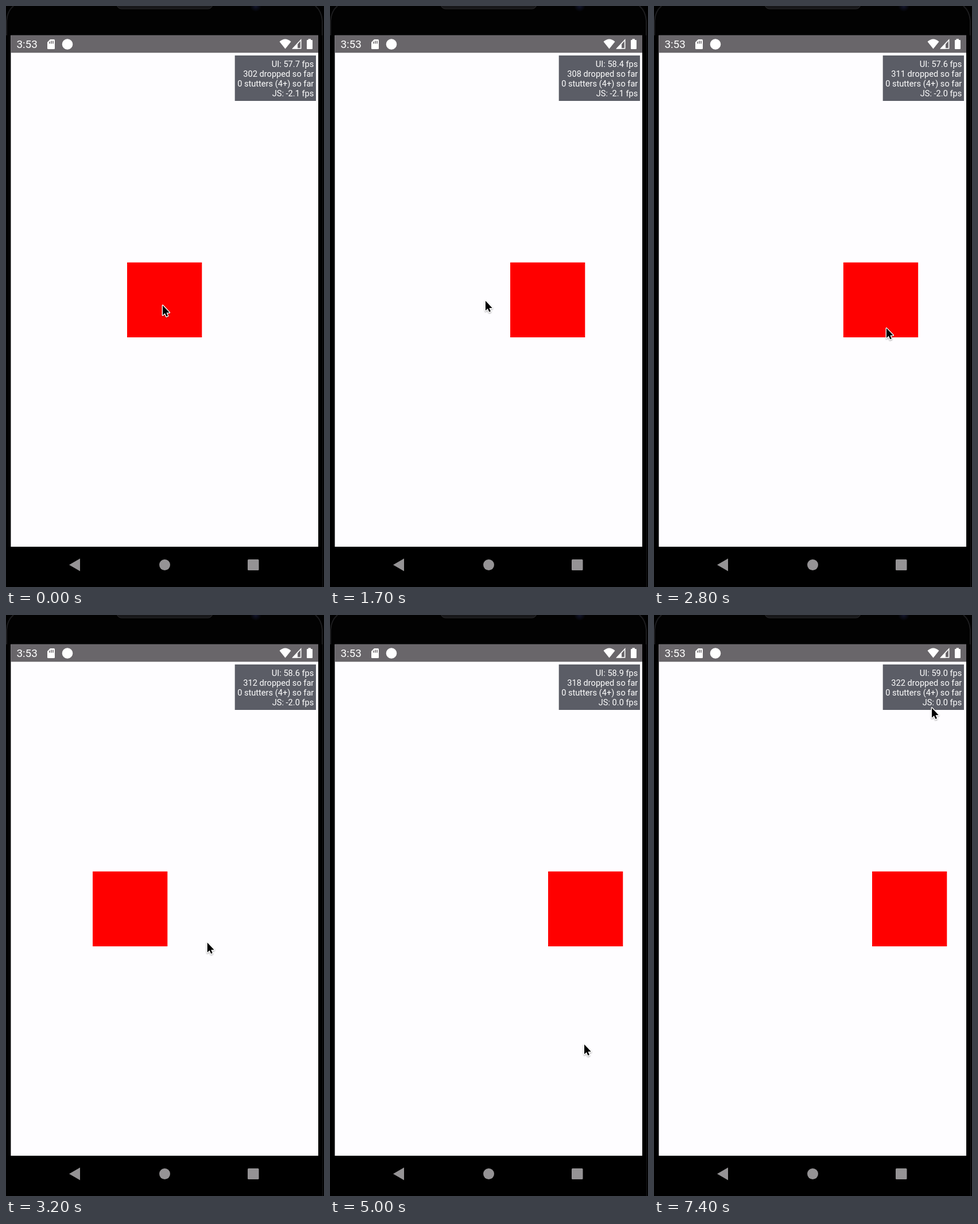
Animation, 554 px wide and 1010 px high, one loop 8 s. Source, as an HTML page:

```html
<!DOCTYPE html>
<html lang="en">
<head>
<meta charset="utf-8">
<title>Draggable square</title>
<style>
  html, body { margin: 0; width: 100%; height: 100%; overflow: hidden; background: #000; }
  svg { display: block; width: 100vw; height: 100vh; }
  text { font-family: Roboto, sans-serif; fill: #fff; }
  .stats { font-size: 14.6px; text-anchor: end; }
</style>
</head>
<body>
<svg viewBox="0 0 554 1010">
  <defs>
    <clipPath id="screen"><rect x="8" y="51" width="536" height="889"/></clipPath>
    <radialGradient id="sheen" gradientUnits="userSpaceOnUse" r="1" gradientTransform="translate(390 0) scale(190 55)">
      <stop stop-color="#131316"/><stop offset="1" stop-color="#020202"/>
    </radialGradient>
    <radialGradient id="lens">
      <stop stop-color="#11142c"/><stop offset="1" stop-color="#11142c" stop-opacity="0"/>
    </radialGradient>
    <filter id="shade" x="-50%" y="-50%" width="200%" height="200%">
      <feDropShadow dx="0" dy="1.2" stdDeviation="1" flood-opacity=".4"/>
    </filter>
  </defs>

  <rect width="554" height="1010"/>
  <path d="M0 51V24Q2 8 12 0H540Q549 8 551 24V51Z" fill="url(#sheen)"/>
  <path d="M1 51V26Q2 9 13 0M551 51V26Q550 9 539 0" fill="none" stroke="#1c1c1e" stroke-width="2"/>
  <path d="M551.5 51V1010" stroke="#151517"/>
  <rect x="193" y="-14" width="167" height="19" rx="8" fill="#171719" stroke="#29292b"/>
  <circle cx="435" cy="0" r="10" fill="url(#lens)"/>

  <rect x="8.4" y="51" width="535.6" height="889" fill="#fefdff"/>
  <rect x="8.4" y="50.7" width="535.6" height="30.6" fill="#69666a"/>

  <text x="18.4" y="73.2" font-size="18.9">3:53</text>
  <g fill="#fff">
    <path d="M77 58H83.5Q85 58 85 59.5V73.5Q85 75 83.5 75H73.5Q72 75 72 73.5V63Z"/>
    <path d="M76 62v3.5M79 60.5v5M82 60.5v5" stroke="#69666a" stroke-width="1.5"/>
    <circle cx="107" cy="66.5" r="9.3"/>
    <path d="M486.5 74.5L476.5 62Q486.5 53 496.5 62Z"/>
    <path d="M513.7 59V73.7H500Z" fill="none" stroke="#fff" stroke-width="1.6"/>
    <path d="M498.5 74.5L508 65V74.5Z"/>
    <path d="M526.5 59V57.2H531V59H533Q534 59 534 60V74Q534 75 533 75H525Q524 75 524 74V60Q524 59 525 59Z"/>
  </g>

  <g clip-path="url(#screen)"><rect id="square" y="445.8" width="130.3" height="130.2" fill="#f00"/></g>

  <rect x="398.7" y="86" width="141.3" height="79" fill="#5b5d66"/>
  <g class="stats">
    <text id="ui" x="536.3" y="105.5"/>
    <text id="dropped" x="536.3" y="122.7"/>
    <text x="536.3" y="139.8">0 stutters (4+) so far</text>
    <text id="js" x="536.3" y="157"/>
  </g>

  <g fill="#959395">
    <path d="M110 971.5L129 960.5V982.5Z"/>
    <circle cx="276.5" cy="971.5" r="9.5"/>
    <rect x="421" y="962" width="19.5" height="19" rx="1.5"/>
  </g>

  <path id="cursor" d="M0 0V17L3.9 13.4L6.4 19.3L9 18.2L6.5 12.4H11.8Z" stroke="#fff"
    stroke-width="2.6" stroke-linejoin="round" paint-order="stroke" filter="url(#shade)"/>
</svg>
<script>
const LOOP = 8000, STEP = 100;
const LAG = 120, RELEASE = 4000;

// Turning points of the pointer: time, position
const swings = [
  [0, 273], [280, 214], [680, 443], [1080, 70], [1420, 443], [1926, 148],
  [2808, 405], [3018, 189], [3336, 453], [3480, 453], [3680, 135],
  [RELEASE, 442], [4500, 442], [4700, 404], [5000, 443], [6500, 484]
];
const drift = [
  [0, 520], [1700, 512], [3200, 569], [3800, 604], [4300, 620],
  [4500, 620], [5000, 746], [5400, 262], [6500, 161]
];

// Monitor levels by refresh count
const MONITOR_START = 200, REFRESH = 480;
const uiLevel = [[-1, 57.7], [3, 58.4], [4, 56.6], [6, 58.6], [7, 58.6], [10, 58.9], [15, 59]];
const dropLevel = [[-1, 302], [3, 308], [4, 311], [7, 313], [10, 318], [15, 322]];

const linear = u => u;
const swing = u => (1 - Math.cos(Math.PI * u)) / 2;

function along(points, t, ease) {
  const i = points.findIndex(p => p[0] > t);
  if (i < 0) return points[points.length - 1][1];
  if (i === 0) return points[0][1];
  const [t0, a] = points[i - 1], [t1, b] = points[i];
  return a + (b - a) * ease((t - t0) / (t1 - t0));
}

const el = id => document.getElementById(id);
const square = el('square'), cursor = el('cursor');

function render(time) {
  const t = Math.floor(time % LOOP / STEP) * STEP;
  const x = along(swings, t, swing), y = along(drift, t, swing);
  cursor.setAttribute('transform', `translate(${x} ${y + 0.5})`);

  // The square trails the pointer until it is released
  square.setAttribute('x', along(swings, Math.min(t - LAG, RELEASE), swing) - 62);

  const n = Math.floor((t - MONITOR_START) / REFRESH);
  const js = n > 6 ? 0 : n > 4 ? -2 : -2.1;
  el('ui').textContent = `UI: ${along(uiLevel, n, linear).toFixed(1)} fps`;
  el('dropped').textContent = `${Math.floor(along(dropLevel, n, linear))} dropped so far`;
  el('js').textContent = `JS: ${js.toFixed(1)} fps`;
}

const start = performance.now();
function tick() {
  render(performance.now() - start);
  requestAnimationFrame(tick);
}
tick();
</script>
</body>
</html>
```
